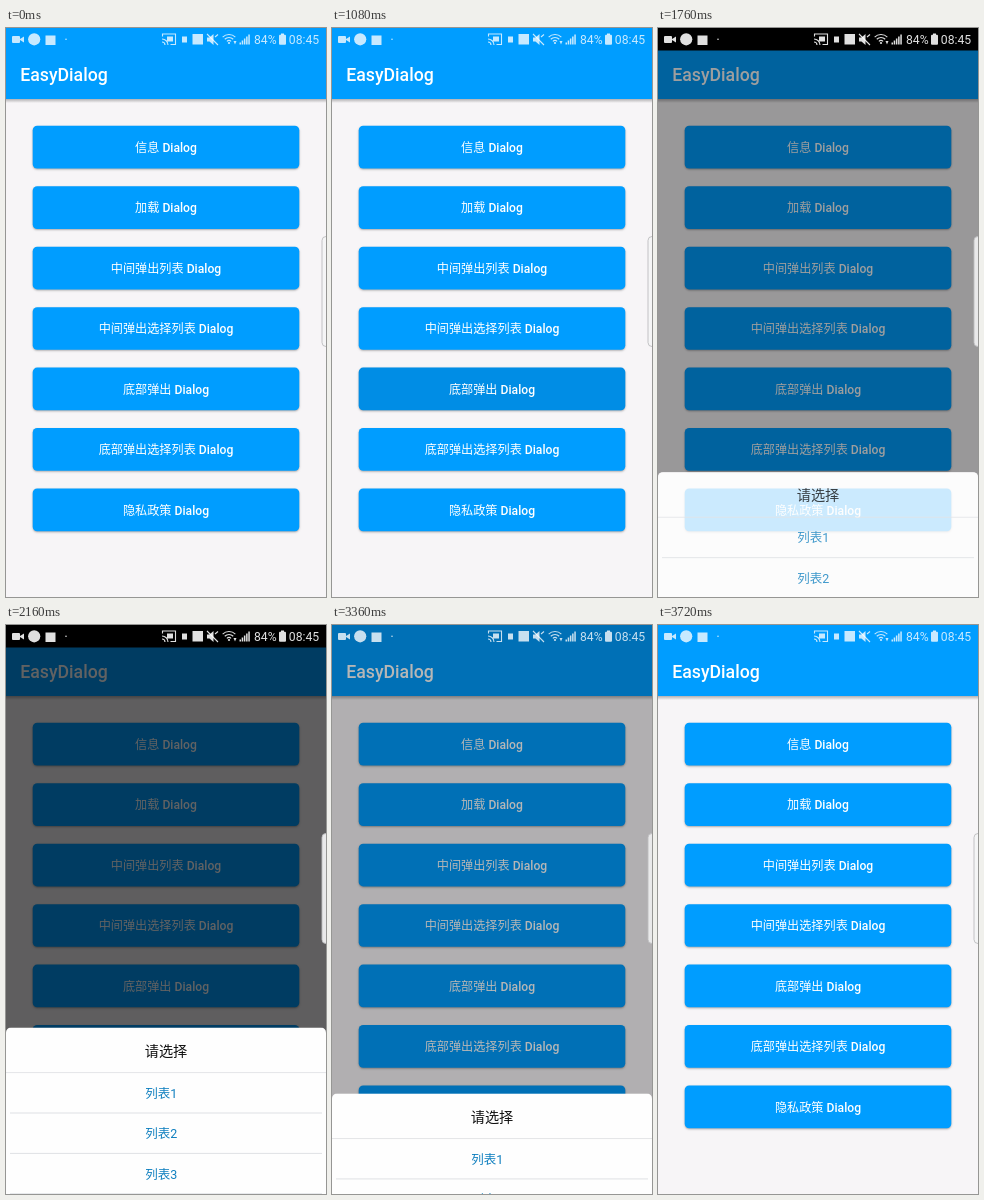
These frames come from a looping animation (320x569 px, 3.8 s). An HTML page with a canvas:

```html
<!DOCTYPE html>
<html lang="zh-CN">
<head>
<meta charset="utf-8">
<style>
  html, body { margin: 0; width: 100%; height: 100%; overflow: hidden; background: #f7f5f7; }
  canvas { display: block; width: 320px; height: 569px; }
</style>
</head>
<body>
<canvas id="stage"></canvas>
<script>
const W = 320, H = 569, LOOP = 3800;
const BLUE = '#009dff', PAPER = '#f7f5f7';
const FONT = 'Roboto, "Noto Sans CJK SC", "Noto Sans CJK", sans-serif';
const LABELS = ['信息', '加载', '中间弹出列表', '中间弹出选择列表', '底部弹出', '底部弹出选择列表', '隐私政策'];
const PRESSED = 4, PANEL_TOP = 402.5, MAX_DIM = 0.615;

const canvas = document.getElementById('stage');
const ratio = window.devicePixelRatio || 1;
canvas.width = Math.round(W * ratio);
canvas.height = Math.round(H * ratio);
const ctx = canvas.getContext('2d');
ctx.scale(ratio, ratio);

const progress = (t, start, length) => Math.min(1, Math.max(0, (t - start) / length));
const ease = p => (1 - Math.cos(Math.PI * p)) / 2;

function rect(x, y, w, h, color) {
  ctx.fillStyle = color;
  ctx.fillRect(x, y, w, h);
}

function roundPath(x, y, w, h, r) {
  ctx.beginPath();
  ctx.roundRect(x, y, w, h, r);
}

function text(str, x, y, size, color, weight = 400, align = 'left') {
  ctx.font = `${weight} ${size}px ${FONT}`;
  ctx.textAlign = align;
  ctx.fillStyle = color;
  ctx.fillText(str, x, y);
}

function poly(...points) {
  ctx.beginPath();
  points.forEach(([x, y]) => ctx.lineTo(x, y));
  ctx.closePath();
  ctx.fill();
}

function dot(x, y, r) {
  ctx.beginPath();
  ctx.arc(x, y, r, 0, Math.PI * 2);
  ctx.fill();
}

function drawButton(label, index, press) {
  const y = 97.8 + index * 60.45;
  ctx.save();
  ctx.shadowColor = 'rgba(0,0,0,0.3)';
  ctx.shadowBlur = 2 * ratio;
  ctx.shadowOffsetY = ratio;
  ctx.fillStyle = BLUE;
  roundPath(26.7, y, 266.6, 42.7, 4.5);
  ctx.fill();
  ctx.restore();
  if (press > 0) {
    ctx.fillStyle = `rgba(0,0,0,${0.1 * press})`;
    ctx.fill();
  }
  text(label + ' Dialog', 160, y + 26, 12.15, '#fff', 500, 'center');
}

function drawPage(press) {
  rect(0, 0, W, H, PAPER);
  const shade = ctx.createLinearGradient(0, 71, 0, 75);
  shade.addColorStop(0, 'rgba(0,0,0,0.28)');
  shade.addColorStop(1, 'rgba(0,0,0,0)');
  rect(0, 71, W, 4, shade);
  rect(0, 0, W, 71, BLUE);
  text('EasyDialog', 14.2, 53.3, 17.7, '#fff', 500);
  LABELS.forEach((label, i) => drawButton(label, i, i === PRESSED ? press : 0));
}

function drawPanel(top, alpha, press) {
  ctx.save();
  roundPath(0, top, W, H, [5, 5, 0, 0]);
  ctx.clip();
  if (alpha < 1) drawPage(press);
  ctx.globalAlpha = alpha;
  rect(0, top, W, H, '#fefefe');
  text('请选择', 160, top + 28.2, 14.2, '#111', 400, 'center');
  rect(0, top + 44.6, W, 1, '#e4e5e8');
  for (let i = 0; i < 3; i++) {
    const y = top + 45 + i * 40.4;
    text('列表' + (i + 1), 139.2, y + 25.3, 12.5, '#0f7fbf');
    rect(4, y + 40, W - 8, 1, '#dfe1e5');
  }
  ctx.restore();
}

function drawWaves(x, y) {
  for (const r of [3, 6, 9]) {
    ctx.beginPath();
    ctx.arc(x, y, r, -Math.PI * 0.75, -Math.PI * 0.25);
    ctx.stroke();
  }
  dot(x, y - 0.5, 1.1);
}

function drawStatus(dark) {
  if (dark) rect(0, 0, W, 22.5, '#000');
  ctx.save();
  ctx.globalAlpha = dark ? 0.88 : 0.78;
  ctx.fillStyle = ctx.strokeStyle = '#fff';
  ctx.lineWidth = 1.1;

  // Notification side
  roundPath(6, 8, 8, 7, 1);
  ctx.fill();
  poly([14, 11], [18, 8.5], [18, 14.5], [14, 12]);
  dot(28.2, 11.3, 6.1);
  ctx.fillRect(39.5, 7.5, 10, 9.5);
  dot(60, 11.3, 0.8);

  // Screen cast
  ctx.beginPath();
  [[156.5, 8.5], [156.5, 6], [169.5, 6], [169.5, 16.5], [164.5, 16.5]].forEach(p => ctx.lineTo(...p));
  ctx.stroke();
  for (const r of [3, 6]) {
    ctx.beginPath();
    ctx.arc(156, 17, r, -Math.PI / 2, 0);
    ctx.stroke();
  }
  ctx.fillRect(161, 8.5, 6, 5);

  // Radios
  ctx.fillRect(176, 8.5, 5, 6);
  ctx.fillRect(186.5, 6, 10.5, 10.5);

  // Muted speaker
  poly([201, 9.5], [203.5, 9.5], [207.5, 6], [207.5, 17], [203.5, 13.5], [201, 13.5]);
  ctx.beginPath();
  ctx.moveTo(201, 6);
  ctx.lineTo(212, 17);
  ctx.moveTo(209, 9);
  ctx.lineTo(212, 6.5);
  ctx.stroke();

  drawWaves(223, 15.5);
  poly([227.5, 13], [230.5, 13], [229, 16.5]);
  for (let i = 0; i < 5; i++) {
    const h = 2 + i * 2;
    ctx.fillRect(233.5 + i * 2.2, 16.5 - h, 1.5, h);
  }
  text('84%', 248, 16, 12.2, '#fff');
  ctx.fillRect(275, 5.5, 3, 1.5);
  roundPath(273, 6.7, 7, 10, 1);
  ctx.fill();
  text('08:45', 282.8, 16, 12.2, '#fff');
  ctx.restore();
}

function drawHandle(dim) {
  roundPath(316, 208.5, 10, 110, 4);
  ctx.fillStyle = dim > 0.2 ? '#e9e9ea' : '#f5f5f6';
  ctx.fill();
  ctx.strokeStyle = '#bdbdbf';
  ctx.lineWidth = 0.9;
  ctx.stroke();
}

function draw(t) {
  const enter = progress(t, 1560, 300), leave = progress(t, 3230, 300);
  const dim = MAX_DIM * (progress(t, 1575, 300) - progress(t, 3200, 300));
  const press = progress(t, 900, 160) - progress(t, 1400, 200);
  drawPage(press);
  if (dim > 0) rect(0, 0, W, H, `rgba(0,0,0,${dim})`);
  if (enter > 0 && leave < 1) {
    const hidden = 1 - ease(enter) + ease(leave);
    drawPanel(PANEL_TOP + hidden * (H - PANEL_TOP), Math.min(1, enter * 1.2), press);
  }
  drawStatus(t >= 1600 && t < 3250);
  drawHandle(dim);
}

function cadence(t) {
  const offset = t % 120;
  return t - offset + (offset >= 80 ? 80 : 0);
}

function tick() {
  draw(cadence(performance.now() % LOOP));
  requestAnimationFrame(tick);
}
tick();
</script>
</body>
</html>
```
